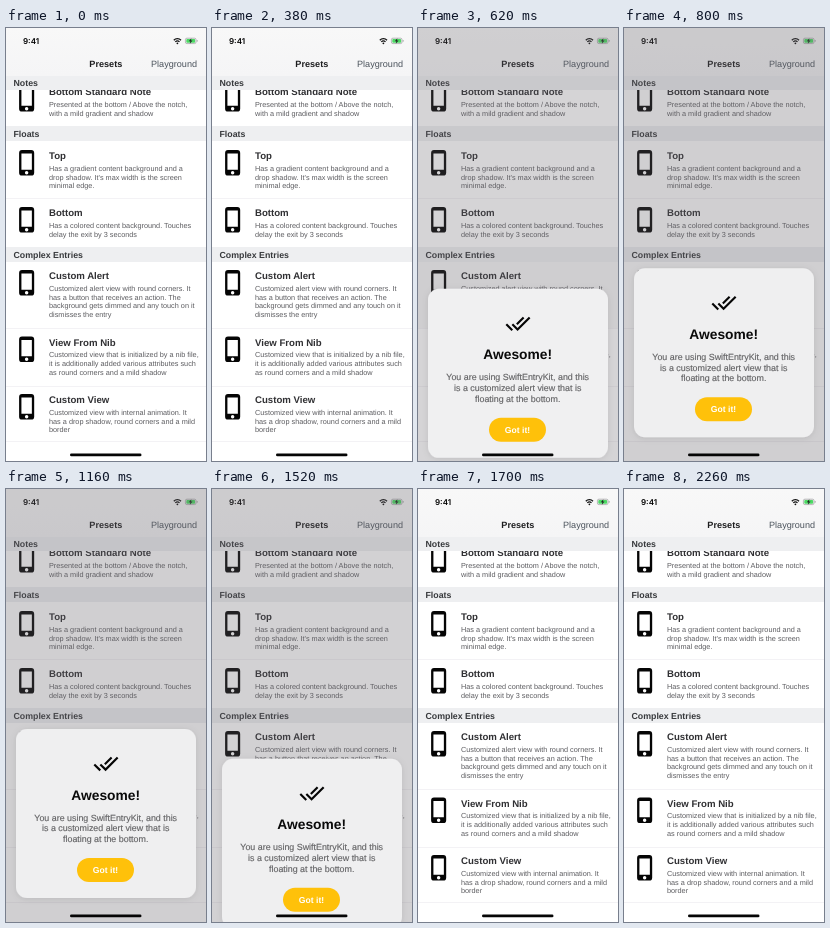
Animation, 200 px wide and 433 px high, one loop 2300 ms. Source, as an HTML page:

```html
<!DOCTYPE html>
<html lang="en">
<head>
<meta charset="utf-8">
<title>Presets</title>
<style>
html, body { margin: 0; width: 100%; height: 100%; overflow: hidden; background: #fff; }
svg { display: block; width: 100vw; height: 100vh; }
text { font-family: "Liberation Sans", Arial, sans-serif; text-rendering: geometricPrecision; }
.title { font-size: 9.65px; font-weight: 700; fill: #303033; }
.desc { font-size: 7.3px; fill: #5c5c60; }
.section { font-size: 8.8px; font-weight: 700; fill: #37393c; }
.mid { text-anchor: middle; }
</style>
</head>
<body>
<svg viewBox="0 0 200 433" preserveAspectRatio="none">
  <defs>
    <path id="phone" fill="#050505" d="M15.5 1h-8A2.5 2.5 0 0 0 5 3.5v17A2.5 2.5 0 0 0 7.5 23h8a2.5 2.5 0 0 0 2.5-2.5v-17A2.5 2.5 0 0 0 15.5 1zm-4 21a1.5 1.5 0 1 1 0-3 1.5 1.5 0 0 1 0 3zM16 18H7V4h9z"/>
    <linearGradient id="bar" x2="0" y2="1">
      <stop stop-color="#f8f8f8"/><stop offset="1" stop-color="#f5f5f6"/>
    </linearGradient>
    <filter id="shadow" x="-15%" y="-15%" width="130%" height="130%">
      <feDropShadow dx="0" dy="1" stdDeviation="3" flood-color="#000" flood-opacity=".1"/>
    </filter>
  </defs>

  <rect width="200" height="433" fill="#fff"/>
  <rect id="pressed" y="234" width="200" height="66" fill="#d0d0d2" opacity="0"/>
  <path d="M0 170.5h200M0 300.5h200M0 358.5h200M0 413.5h200" stroke="#f3f2f5"/>
  <g id="list"></g>

  <rect width="200" height="48" fill="url(#bar)"/>
  <text x="17" y="16" style="font:600 8px Inter,sans-serif">9:41</text>
  <g fill="none" stroke="#111" stroke-width="1.3">
    <path d="M167.8 12.2a5 5 0 0 1 7.2 0"/>
    <path d="M169.3 13.9a3 3 0 0 1 4.2 0"/>
  </g>
  <circle cx="171.4" cy="15.3" r=".9" fill="#111"/>
  <rect x="179.4" y="10.2" width="10.6" height="5.4" rx="1.5" fill="none" stroke="#8c8c8e" stroke-width=".6"/>
  <rect x="180.3" y="11.1" width="8.8" height="3.6" rx=".8" fill="#4cd964"/>
  <path d="M190.8 12v1.8q.9-.3.9-.9t-.9-.9z" fill="#8c8c8e"/>
  <path d="M185.4 10.2l-2.6 3.1h1.6l-.6 2.4 2.7-3.2h-1.6z" fill="#222"/>
  <text class="mid" x="99.8" y="39.2" font-size="9.1" font-weight="700" fill="#1d1d1f">Presets</text>
  <text x="145" y="39.2" font-size="9.1" fill="#4b535c">Playground</text>

  <rect id="dim" width="200" height="433" fill="#646268" opacity="0"/>

  <g id="card">
    <rect id="panel" x="10" y="240" width="180" height="169" rx="11" filter="url(#shadow)"/>
    <path transform="translate(87.1 261.8) scale(1.07)" fill="#050505" d="M18 7l-1.41-1.41-6.34 6.34 1.41 1.41L18 7zm4.24-1.41L11.66 16.17 7.48 12l-1.41 1.41L11.66 19l12-12-1.42-1.41zM.41 13.41L6 19l1.41-1.41L1.83 12 .41 13.41z"/>
    <text class="mid" x="99.7" y="310.5" font-size="13.8" font-weight="700" fill="#0a0a0a">Awesome!</text>
    <g class="mid" font-size="8.9" fill="#626264" stroke="#626264" stroke-width=".15">
      <text x="99.7" y="331.6">You are using SwiftEntryKit, and this</text>
      <text x="99.7" y="342.4">is a customized alert view that is</text>
      <text x="99.7" y="353.2">floating at the bottom.</text>
    </g>
    <rect x="71" y="369" width="57" height="24" rx="12" fill="#ffc10a"/>
    <text class="mid" x="99.5" y="384" font-size="8.6" font-weight="700" fill="#fff">Got it!</text>
  </g>
  <rect x="64" y="425.5" width="71.5" height="2.8" rx="1.4" fill="#050505"/>
</svg>
<script>
const LOOP = 2300, TRAVEL = 193;
const el = id => document.getElementById(id);
const clamp = x => Math.max(0, Math.min(1, x));
const ramp = (t, from, to) => {
  const x = clamp((t - from) / (to - from));
  return x * x * (3 - 2 * x);
};

// title centre, title, description lines
const rows = [
  [64, "Bottom Standard Note", "Presented at the bottom / Above the notch,", "with a mild gradient and shadow"],
  [128, "Top", "Has a gradient content background and a", "drop shadow. It's max width is the screen", "minimal edge."],
  [185, "Bottom", "Has a colored content background. Touches", "delay the exit by 3 seconds"],
  [248, "Custom Alert", "Customized alert view with round corners. It", "has a button that receives an action. The", "background gets dimmed and any touch on it", "dismisses the entry"],
  [314.5, "View From Nib", "Customized view that is initialized by a nib file,", "it is additionally added various attributes such", "as round corners and a mild shadow"],
  [372, "Custom View", "Customized view with internal animation. It", "has a drop shadow, round corners and a mild", "border"]
];
const sections = [[48, 14, "Notes"], [98, 15, "Floats"], [219, 15, "Complex Entries"]];

const text = (cls, x, y, s) => `<text class="${cls}" x="${x}" y="${y}">${s}</text>`;

el("list").innerHTML = rows.map(([y, title, ...lines]) =>
  `<use href="#phone" transform="translate(7.3 ${y - 7.1}) scale(1.16)"/>` +
  text("title", 43, y + 3.3, title) +
  lines.map((s, i) => text("desc", 43, y + 14.8 + i * 8.7, s)).join("")
).join("") + sections.map(([y, h, s]) =>
  `<rect y="${y}" width="200" height="${h}" fill="#eeeff1"/>` + text("section", 7.5, y + h - 4, s)
).join("");

// Critically damped spring in, eased slide out; 0 hidden, 1 at rest.
function shown(t) {
  const x = Math.max(0, t - 492) * 0.0294;
  const enter = 1 - (1 + x) * Math.exp(-x);
  return enter * (1 - ramp(t, 1490, 1615));
}

function draw(t) {
  const p = shown(t);
  const shade = ramp(t, 505, 650) - ramp(t, 1510, 1620);
  const grey = Math.round(251 - 12 * shade);
  el("card").setAttribute("transform", `translate(0 ${(TRAVEL * (1 - p)).toFixed(2)})`);
  el("card").setAttribute("visibility", p > 0 ? "visible" : "hidden");
  el("panel").setAttribute("fill", `rgb(${grey},${grey},${grey + 1})`);
  el("dim").setAttribute("opacity", 0.3 * shade);
  el("pressed").setAttribute("opacity", t < 440 ? 0 : 1 - ramp(t, 540, 650));
}

const start = performance.now();
function tick(now) {
  draw(Math.max(0, now - start) % LOOP);
  requestAnimationFrame(tick);
}
draw(0);
requestAnimationFrame(tick);
</script>
</body>
</html>
```
